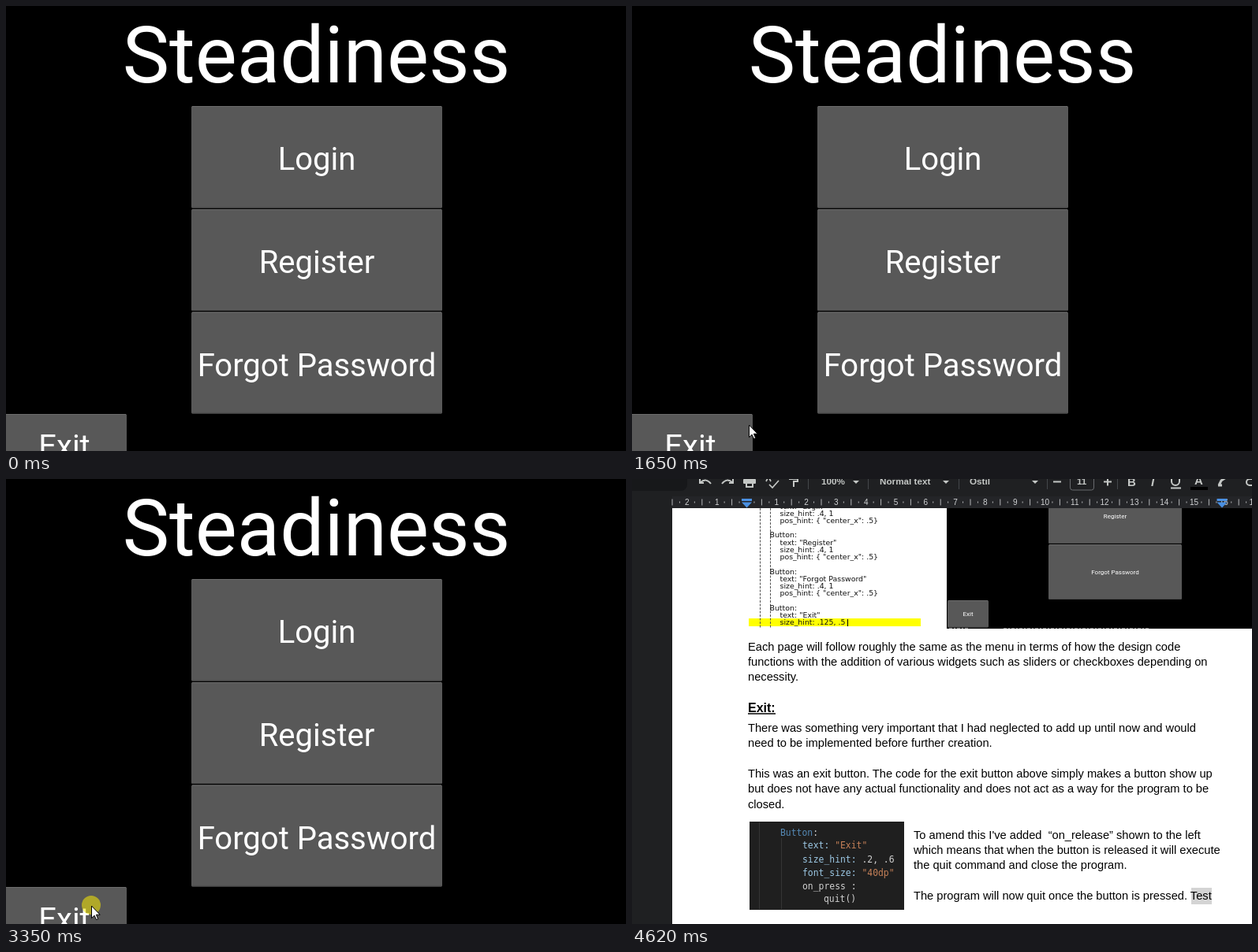
An HTML page that plays this animation: 786 px wide and 565 px high, repeating every 5.54 s.

```html
<!DOCTYPE html>
<html lang="en">
<head>
<meta charset="utf-8">
<title>Exit button demo</title>
<style>
  html, body { margin: 0; width: 100%; height: 100%; overflow: hidden; background: #000; }
  svg { display: block; width: 100%; height: 100%; }
  text { white-space: pre; }
  .app { font-family: Roboto, sans-serif; fill: #fff; text-anchor: middle; }
  .body { font: 14.667px "Liberation Sans", sans-serif; fill: #000; }
  .listing { font: 9.4px "DejaVu Sans", sans-serif; fill: #111; }
  .code { font: 11.4px "DejaVu Sans Mono", monospace; fill: #d0d0d0; }
  .bar { font: bold 11.7px "Liberation Sans", sans-serif; fill: #c4c7c5; }
  .ruler { font: 10px "Liberation Sans", sans-serif; fill: #d0d2d4; text-anchor: middle; }
</style>
</head>
<body>
<svg viewBox="0 0 786 565" preserveAspectRatio="none">
  <defs><clipPath id="pageClip"><rect y="37" width="786" height="154"/></clipPath></defs>
  <g id="menu"></g>
  <g id="doc"></g>
  <circle id="press" r="12" fill="#fff000" fill-opacity=".53"/>
  <path id="arrow" d="M.5 1V16.6L4.1 13.2 6.5 18.5 8.7 17.6 6.4 12.2H11.2Z" fill="#fff" stroke="#000"/>
  <path id="beam" d="M-3.5-8.5H-1L0-7.5 1-8.5H3.5M0-7.5V7.5M-3.5 8.5H-1L0 7.5 1 8.5H3.5" fill="none" stroke="#000"/>
</svg>
<script>
const $ = id => document.getElementById(id);
const LOOP = 5540;

const rect = (x, y, w, h, fill, extra = '') =>
  `<rect x="${x}" y="${y}" width="${w}" height="${h}" fill="${fill}" ${extra}/>`;
const text = (x, y, str, extra = '') => `<text x="${x}" y="${y}" ${extra}>${str}</text>`;
const path = (d, stroke, width = 1, extra = '') =>
  `<path d="${d}" fill="none" stroke="${stroke}" stroke-width="${width}" ${extra}/>`;
const group = (cls, ...parts) => `<g class="${cls}">${parts.join('')}</g>`;

function button(x, y, w, h, label, size, baseline) {
  return rect(x, y, w, h, '#585858', 'rx="1.5"') +
    path(`M${x + 1} ${y + .5}h${w - 2}`, '#6c6c6c') +
    path(`M${x + 1} ${y + h - .5}h${w - 2}`, '#484848') +
    text(x + w / 2, baseline, label, `font-size="${size}"`);
}

function drawMenu() {
  return rect(0, 0, 786, 565, '#000') + group('app',
    text(393.5, 97, 'Steadiness', 'font-size="100"'),
    button(235, 127, 318, 129.5, 'Login', 40, 208),
    button(235, 258, 318, 129, 'Register', 40, 338.5),
    button(235, 388.5, 318, 129, 'Forgot Password', 40, 469.5),
    button(-5, 518, 158, 130, 'Exit', 40, 573));
}

function drawToolbar() {
  const ink = '#c4c7c5';
  const carets = [284, 398, 511].map(x => `<path d="M${x - 4} 2h8l-4 4z" fill="${ink}"/>`);
  const dividers = [223, 299, 414, 526, 615].map(x => path(`M${x}.5 0V13`, '#44474a'));
  const icons =
    path('M86 0V5H91M86.5 4.5Q94-2 100 6M128 0V5H123M127.5 4.5Q120-2 114 6', ink, 2) +
    rect(141, 0, 16, 6, ink, 'rx="1"') + path('M145 4V10H153V4', ink, 2) +
    path('M170 3l3-6 3 6M174 7l4 4 8-9', ink, 1.7) +
    path('M199 0h11v3h-5v7', ink, 2) +
    path('M534 3.5h10M598 3.5h10M603-2V8.5', ink, 2) +
    rect(555.5, -12, 30, 26, 'none', 'stroke="#686b6e" rx="3"') +
    path('M684-4V3a5 5 0 0 0 10 0V-4M683 11.5h13', ink, 2) +
    rect(708, 10, 22, 4, '#000') +
    path('M744 8l3-6 6-4M743 8h5', ink, 3) +
    path('M786 0h-3a4 4 0 0 0 0 8h3', ink, 2);
  return rect(-10, -10, 80, 25, '#17181a', 'rx="8"') + carets.join('') + dividers.join('') + icons +
    group('bar',
      text(240, 7, '100%'), text(314, 7, 'Normal text'), text(428, 7, 'Ostil'),
      text(564, 7, '11'), text(628, 9, 'B', 'font-size="15"'),
      text(658, 9, 'I', 'font-size="15" font-style="italic"'),
      text(713, 7, 'A', 'font-size="15"'));
}

function drawRuler() {
  const cm = 37.8, zero = 145.5;
  let out = rect(51, 22, 735, 15, '#242528');
  for (let q = -10; q < 69; q++) {
    const x = zero + q * cm / 4;
    if (q % 4 === 0) out += q ? text(x, 33, Math.abs(q / 4)) : '';
    else {
      const half = q % 2 ? 1 : 4;
      out += path(`M${x} ${29.5 - half}v${2 * half}`, '#b4b6b8');
    }
  }
  for (const x of [145.5, 748])
    out += `<path d="M${x - 6.5} 25h13v3h-13zM${x - 6.5} 29.5h13l-6.5 7z" fill="#4a90e2"/>`;
  return group('ruler', out);
}

function drawListing() {
  const hint = 'size_hint: .4, 1', pos = 'pos_hint: { "center_x": .5}';
  const lines = ['text: "Login"', hint, pos, '', 'Button:', 'text: "Register"', hint, pos, '',
    'Button:', 'text: "Forgot Password"', hint, pos, '', 'Button:', 'text: "Exit"', 'size_hint: .125, .5'];
  return rect(148, 177, 218, 10, '#ff0') +
    path('M162.5 37V190M175.5 37V190', '#555', 1, 'stroke-dasharray="3 1.5"') +
    group('listing', ...lines.map((s, i) => text(s === 'Button:' ? 174.5 : 187.5, 37.5 + i * 9.23, s))) +
    path('M273.5 178V187', '#000');
}

function drawPreview() {
  return rect(399, 37, 387, 153, '#000') +
    path('M402 189.5H428M471 189.5H657', '#777', 1, 'stroke-dasharray="4 2 2 2"') +
    group('app',
      button(528, 12, 169, 70, 'Register', 8, 50),
      button(528, 83, 169, 70, 'Forgot Password', 8, 121),
      button(400, 154, 52, 34.5, 'Exit', 8, 174));
}

function drawCode() {
  const span = (color, s) => `<tspan fill="${color}">${s}</tspan>`;
  const key = s => span('#9cc8e4', s), str = s => span('#c58058', s);
  return rect(149, 435, 196, 112, '#1f1f1f') +
    path('M161.5 436V546M189.5 456V546', '#343434') +
    group('code',
      text(188, 453, span('#5589b5', 'Button') + ':'),
      text(216, 469, key('text: ') + str('"Exit"')),
      text(216, 487, key('size_hint: ') + '.2, .6'),
      text(216, 504, key('font_size: ') + str('"40dp"')),
      text(216, 520.5, 'on_press :'),
      text(243, 537, 'quit()'));
}

function drawDoc() {
  const column = (x, lines) => lines.map(([y, s]) => text(x, y, s)).join('');
  return rect(0, 0, 786, 565, '#1f2022') + rect(51, 37, 735, 528, '#fff') +
    drawToolbar() + drawRuler() +
    `<g clip-path="url(#pageClip)">${drawListing()}${drawPreview()}</g>` + drawCode() +
    rect(709, 519, 26, 21, '#d4d4d4') + path('M147 298H182', '#000', 1.5) +
    group('body',
      column(147, [
        [218, 'Each page will follow roughly the same as the menu in terms of how the design code'],
        [237, 'functions with the addition of various widgets such as sliders or checkboxes depending on'],
        [256, 'necessity.'],
        [321, 'There was something very important that I had neglected to add up until now and would'],
        [340, 'need to be implemented before further creation.'],
        [379, 'This was an exit button. The code for the exit button above simply makes a button show up'],
        [398, 'but does not have any actual functionality and does not act as a way for the program to be'],
        [418, 'closed.']]),
      text(147, 296, 'Exit:', 'font-size="16" font-weight="bold"'),
      column(357, [
        [457, "To amend this I've added  “on_release” shown to the left"],
        [476, 'which means that when the button is released it will execute'],
        [495, 'the quit command and close the program.'],
        [534, 'The program will now quit once the button is pressed. Test']]));
}

// Pointer route: [ms, x, y]
const route = [
  [20, 725, 560], [60, 716, 551], [180, 704, 541],
  [480, 704, 541], [510, 698, 529], [600, 667, 462], [660, 660, 445],
  [1075, 660, 445], [1130, 642, 441], [1220, 500, 441], [1300, 375, 458], [1370, 322, 471],
  [1565, 322, 471], [1600, 262, 492], [1650, 148, 531], [1720, 124, 538], [1850, 113, 541], [2060, 109, 541],
  [3330, 109, 541], [3350, 108, 541],
  [4110, 108, 541], [4180, 200, 518], [4250, 380, 482], [4290, 470, 478], [4330, 545, 499], [4370, 576, 517],
  [4520, 576, 517], [4560, 620, 532], [4620, 733, 566]
];

function pointerAt(t) {
  const i = route.findIndex(p => p[0] > t);
  if (i < 1) return route[i < 0 ? route.length - 1 : 0].slice(1);
  const [t0, x0, y0] = route[i - 1], [t1, x1, y1] = route[i];
  const k = (t - t0) / (t1 - t0);
  return [x0 + (x1 - x0) * k, y0 + (y1 - y0) * k];
}

const show = (id, on) => $(id).setAttribute('visibility', on ? 'visible' : 'hidden');
const within = (t, from, to) => t >= from && t < to;

function render() {
  const t = performance.now() % LOOP;
  const [x, y] = pointerAt(t).map(Math.round);
  show('menu', t < 3500);
  show('doc', t >= 3500);
  show('press', within(t, 2220, 2390) || within(t, 3300, 4120));
  show('arrow', within(t, 20, 3520));
  show('beam', within(t, 3520, 4620));
  $('press').setAttribute('transform', `translate(${x} ${y})`);
  $('arrow').setAttribute('transform', `translate(${x} ${y})`);
  $('beam').setAttribute('transform', `translate(${x + .5} ${y})`);
  requestAnimationFrame(render);
}

$('menu').innerHTML = drawMenu();
$('doc').innerHTML = drawDoc();
render();
</script>
</body>
</html>
```
